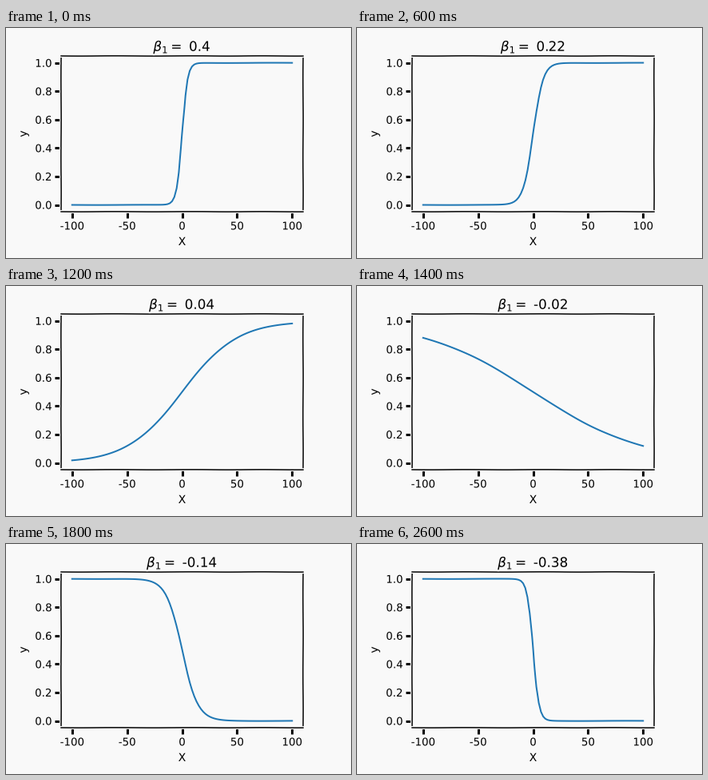
Recreate the animation shown at these times as a matplotlib script. Size 432x288 px, loop 2800 ms.

```python
import matplotlib.pyplot as plt
import numpy as np
from matplotlib import patheffects
from matplotlib.animation import FuncAnimation

W, H, DPI = 432, 288, 72
PAPER = "#f9f9f9"
FRAMES, INTERVAL = 14, 200
LEFT, RIGHT, TOP, BOTTOM = 69, 372, 34.8, 230.4

plt.xkcd(scale=0.15)
plt.rcParams.update({
    "font.family": "DejaVu Sans",
    "figure.facecolor": PAPER,
    "axes.facecolor": PAPER,
    "savefig.facecolor": PAPER,
    "path.effects": [patheffects.withStroke(linewidth=4, foreground=PAPER)],
})

fig = plt.figure(figsize=(W / DPI, H / DPI), dpi=DPI)
ax = fig.add_axes([LEFT / W, 1 - BOTTOM / H,
                   (RIGHT - LEFT) / W, (BOTTOM - TOP) / H])
ax.set_xlim(-110, 110)
ax.set_ylim(-0.05, 1.05)
ax.set_xticks([-100, -50, 0, 50, 100])
ax.set_yticks(np.arange(6) / 5)
ax.tick_params(labelsize=13.4)
ax.tick_params(axis="x", pad=4)


def label(x, y, text, **style):
    """Place an axis label by its baseline, in pixels from the top left."""
    fig.text(x / W, 1 - y / H, text, size=14, ha="center", va="baseline",
             rotation_mode="anchor", **style)


label(220.5, 272, "X")
label(26, 132.5, "y", rotation=90)

x = np.linspace(-100, 100, 100)
curve, = ax.plot(x, np.zeros_like(x), color="#1f77b4", lw=2)
title = ax.set_title("", size=16.8)


def update(i):
    slope = round(0.4 - 0.06 * i, 2)
    curve.set_ydata(1 / (1 + np.exp(-slope * x)))
    title.set_text(rf"$\beta_1 = $ {slope}")
    return curve, title


anim = FuncAnimation(fig, update, frames=FRAMES, interval=INTERVAL,
                     repeat=True, repeat_delay=0, blit=False)
plt.show()
```
